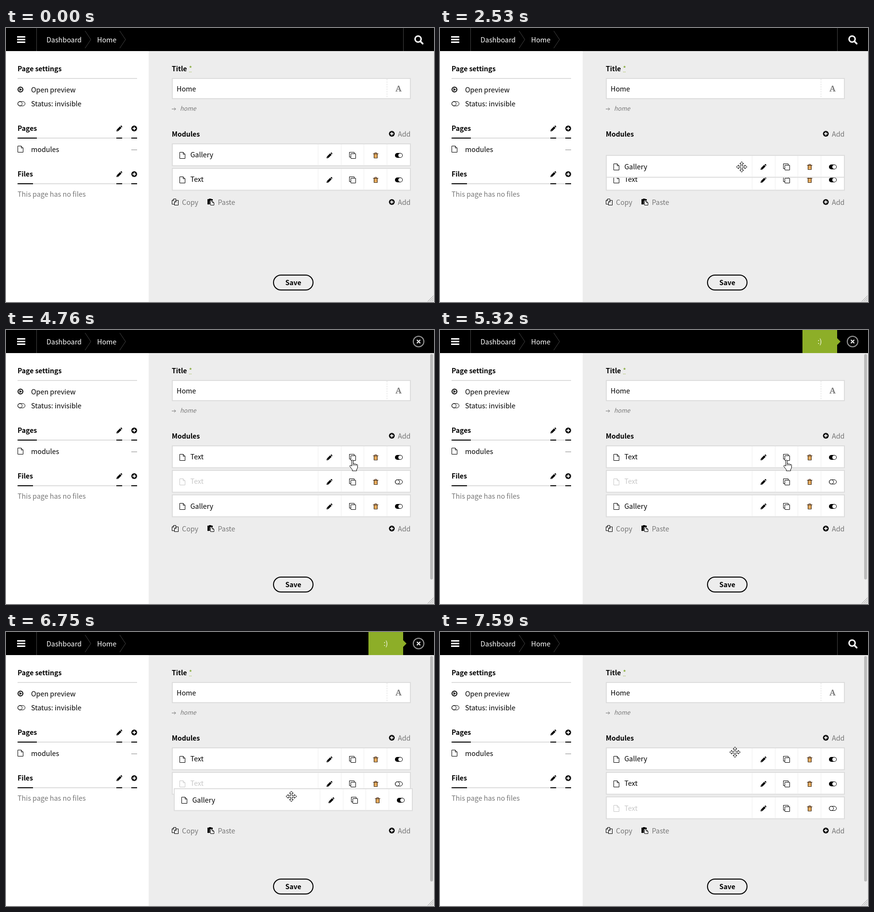
An HTML page that plays this animation: 888 px wide and 570 px high, repeating every 8000 ms.

```html
<!DOCTYPE html>
<html lang="en">
<head>
<meta charset="utf-8">
<title>Page modules</title>
<style>
html, body { margin: 0; width: 100%; height: 100%; overflow: hidden; background: #ededed; }
svg { display: block; }
text { font: 14.32px "Noto Sans CJK JP", "Noto Sans CJK SC", "Noto Sans CJK", "Noto Sans", sans-serif; white-space: pre; }
.b { font-weight: 700; font-size: 14px; }
.g { fill: #777; }
.w { fill: #fff; }
.line { fill: none; stroke: currentColor; }
.pale { color: #c8c8c8; fill: #c8c8c8; }
</style>
</head>
<body>
<svg id="stage" width="888" height="570" viewBox="0 0 888 570">
<defs>
  <g id="pencil"><path d="M-6 6L-5.2 2.4L1.5-4.3L4.6-1.2L-2.2 5.4ZM2.4-5.1L3.5-6Q4.3-6.4 5.2-5.5Q6.4-4.4 5.9-3.5L5.3-2.1Z"/><path d="M-4.6 3.2L-3 4.8" stroke="#fff" stroke-width=".8"/></g>
  <g id="plus"><circle r="6"/><path d="M-3.5 0H3.5M0-3.5V3.5" stroke="#fff" stroke-width="2"/></g>
  <path id="file" class="line" d="M-5.5-6.5H1.5L5.5-2.5V6.5H-5.5ZM1.5-6.5V-2.5H5.5"/>
  <g id="clone" class="line"><path d="M-3.5 3.5H-6.5V-6.5H3.5V-3.5"/><rect x="-3.5" y="-3.5" width="10" height="10" rx=".5"/></g>
  <g id="trash"><path d="M-3.5-3H3.5V5.5H-3.5Z" fill="#ffd08a" stroke="#2b1500"/><path d="M-1.5-1.5V4M1.5-1.5V4" stroke="#b05a00"/><path d="M-5.5-3.5H5.5M-2-4V-5.5H2V-4" fill="none" stroke="#4a2500"/></g>
  <g id="on"><rect x="-8" y="-5" width="16" height="10" rx="5"/><circle cx="3" r="4" fill="#fff"/></g>
  <g id="off" class="line"><rect x="-7.5" y="-4.5" width="15" height="9" rx="4.5"/><circle cx="-3" r="4.5"/></g>
  <g id="pages" class="line"><path d="M-2 4.5H-6.5V-3L-3-6.5H1.5V-3M-3-6.5V-3H-6.5"/><path d="M6.5-3.5V6.5H-1.5V0L2-3.5ZM2-3.5V0H-1.5"/></g>
  <g id="board"><path d="M-7-6H-4V-7H1V-6H4V-3H-1L-2-2V5H-7Z"/><path d="M-.5-1.5H3.5L6.5 1.5V6.5H-.5ZM3.5-1.5V1.5H6.5" fill="#fff" stroke="#000"/></g>
  <path id="move" d="M0-11l4 4.5h-2.5v5h5v-2.5l4.5 4-4.5 4v-2.5h-5v5h2.5l-4 4.5-4-4.5h2.5v-5h-5v2.5l-4.5-4 4.5-4v2.5h5v-5h-2.5z"/>
  <path id="hand" d="M-1.5 13V1.5Q0-.7 1.5 1.5V8.5Q3.5 6.8 4.5 9Q6.5 7.6 7.5 9.8Q10 8.6 10.5 11V15Q10.5 18 8.5 20V23H-.5V20.5L-5.5 14Q-6 11-3.5 11.5L-1.5 13ZM1.5 8.5V12M4.5 9V12M7.5 9.8V12.5"/>
  <path id="arrow" d="M.5.5V16.5L4 13.2L6.5 18.5L8.7 17.5L6.3 12.2H11.5Z"/>
</defs>

<rect width="888" height="570" fill="#ededed"/>
<rect y="48" width="296" height="522" fill="#fff"/>
<rect width="888" height="48"/>
<path d="M23 18.5H40M23 24H40M23 29.5H40" stroke="#fff" stroke-width="3"/>
<path d="M63.5 0V48" stroke="#444"/>
<path d="M164 6L176 24L164 42M236 6L248 24L236 42" fill="none" stroke="#444"/>
<text class="w" x="84" y="30">Dashboard</text>
<text class="w" x="189" y="30">Home</text>
<g id="search">
  <path d="M824.5 0V48" stroke="#444"/>
  <circle cx="855" cy="23" r="6.3" fill="none" stroke="#fff" stroke-width="3"/>
  <path d="M859.8 27.8L864.5 32.5" stroke="#fff" stroke-width="3.4" stroke-linecap="round"/>
</g>
<g id="close">
  <circle cx="856" cy="24" r="11" fill="none" stroke="#999" stroke-width="2"/>
  <path d="M852.5 20.5L859.5 27.5M859.5 20.5L852.5 27.5" stroke="#fff" stroke-width="2"/>
</g>
<g id="note">
  <path d="M752 0H824V17L831 24L824 31V48H752Z" fill="#8dae28"/>
  <text class="w" x="788" y="29" text-anchor="middle">:)</text>
</g>

<text class="b" x="24" y="90">Page settings</text>
<path d="M24 105H272M24 229H272M24 324H272" stroke="#ddd" stroke-width="2"/>
<path d="M24 229H64M229 229H241M260 229H272M24 324H56M229 324H241M260 324H272" stroke="#000" stroke-width="2"/>
<circle cx="30" cy="128" r="5" fill="none" stroke="#000" stroke-width="2"/>
<path d="M28 125L33.3 128L28 131Z"/>
<text x="52" y="134">Open preview</text>
<use href="#off" x="32" y="157.5"/>
<text x="52" y="163">Status: invisible</text>
<text class="b" x="24" y="214">Pages</text>
<use href="#pencil" x="235" y="209"/><use href="#plus" x="266" y="209"/>
<use href="#file" x="30" y="252"/>
<text x="52" y="258">modules</text>
<path d="M260 253.5H272" stroke="#888"/>
<text class="b" x="24" y="309">Files</text>
<use href="#pencil" x="235" y="304"/><use href="#plus" x="266" y="304"/>
<text class="g" x="24" y="351">This page has no files</text>

<text class="b" x="344" y="90">Title</text>
<text x="379.5" y="90" style="fill:#7ba428">*</text>
<path d="M380 91.5H386" stroke="#8dae28" stroke-dasharray="1 1"/>
<rect x="345" y="105" width="494" height="42" fill="#fff" stroke="#ddd" stroke-width="2"/>
<path d="M790.5 106V146" stroke="#ddd" stroke-dasharray="3 2"/>
<text x="354" y="132">Home</text>
<text x="814.5" y="132" text-anchor="middle" class="g" style="font:bold 17px 'Noto Serif','Liberation Serif',serif">A</text>
<path d="M344 168.5H352M349 165.5L352 168.5L349 171.5" fill="none" stroke="#777"/>
<text class="g" x="361" y="172" style="font-size:12.4px;font-style:italic">home</text>
<text class="b" x="344" y="226">Modules</text>
<use href="#plus" x="800.5" y="220"/>
<text class="g" x="813" y="226">Add</text>

<g id="foot">
  <use href="#pages" x="351" y="362"/>
  <text class="g" x="365" y="368">Copy</text>
  <use href="#board" x="425" y="362"/>
  <text class="g" x="439.5" y="368">Paste</text>
  <use href="#plus" x="800.5" y="362"/>
  <text class="g" x="813" y="368">Add</text>
</g>
<rect x="555" y="514" width="82" height="31" rx="15.5" fill="none" stroke="#000" stroke-width="2"/>
<text class="b" x="596" y="535" text-anchor="middle">Save</text>
<path d="M875 569L887 557M879 569L887 561M883 569L887 565" stroke="#999"/>
<rect id="bar" x="880" y="50" width="6" height="469" rx="3" fill="#bbb"/>
<g id="rows"></g>
<g id="cursor" fill="#fff" stroke="#000" stroke-linejoin="round"><use id="shape" href="#arrow"/></g>
</svg>
<script>
const $ = id => document.getElementById(id);
const LOOP = 8000, LEFT = 344, SLOTS = [240, 291, 342];
const SWAP = 2310, DROP = 3130, CLONE = 4760, LIFT = 6640, LAND = 7570, SAVED = 7590;

// time, x, y of the pointer's hot spot, and whether the way there is linear
const track = [
  [1190, 900, 281], [1820, 626, 265],
  [2310, 626, 265], [2830, 625, 328],
  [3500, 625, 328], [4080, 719, 270],
  [5320, 719, 270], [5960, 595, 354], [6120, 589, 361, true],
  [6145, 589, 361], [6170, 587, 365, true],
  [6630, 587, 365], [6750, 592, 342, true], [7140, 612, 250, true]
];

function pointer(t) {
  const i = track.findIndex(k => k[0] > t);
  if (i === 0) return track[0].slice(1, 3);
  if (i < 0) return track[track.length - 1].slice(1, 3);
  const a = track[i - 1], b = track[i];
  let p = (t - a[0]) / (b[0] - a[0]);
  if (!b[3]) p = (1 - Math.cos(Math.PI * p)) / 2;
  return [1, 2].map(n => Math.round(a[n] + (b[n] - a[n]) * p));
}

function makeRow(name, hidden) {
  const pale = hidden ? ' class="pale"' : '';
  const tools = ['pencil', 'clone', 'trash', hidden ? 'off' : 'on'];
  const row = document.createElementNS('http://www.w3.org/2000/svg', 'g');
  row.innerHTML =
    `<rect x="1" y="1" width="494" height="45.5" fill="#fff" stroke="#ddd" stroke-width="2"/>
    <path d="M303.5 2V45M351.5 2V45M398.5 2V45M446.5 2V45" stroke="#eee"/>
    <g${pale}><use href="#file" x="22" y="25"/><text x="38.5">${name}</text></g>` +
    tools.map((id, i) => `<use href="#${id}" x="${327 + i * 48}" y="25"/>`).join('');
  $('rows').append(row);
  return row;
}

const text = makeRow('Text'), copy = makeRow('Text', true), gallery = makeRow('Gallery');

function place(row, x, y) {
  row.setAttribute('transform', `translate(${x} ${y})`);
  row.querySelector('text').setAttribute('y', y === SLOTS[0] || y === SLOTS[1] ? 29 : 30);
}
const seat = (row, slot) => place(row, LEFT, SLOTS[slot]);
const show = (el, on) => el.setAttribute('visibility', on ? 'visible' : 'hidden');

function drawRows(t) {
  let slots;
  if (t < SWAP) slots = [1, 1, 0];
  else if (t < DROP) {
    const [x, y] = pointer(t), top = y - 25;
    slots = [top > 265 ? 0 : 1, 1];
    place(gallery, LEFT + x - 626, top);
  } else if (t < CLONE) slots = [0, 1, 1];
  else if (t < LIFT) slots = [0, 1, 2];
  else if (t < LAND) {
    const [x, y] = pointer(t - 34), top = y - 23;
    slots = [top < 266 ? 1 : 0, top < 317 ? 2 : 1];
    place(gallery, LEFT + x - 587, top);
  } else slots = [1, 2, 0];
  seat(text, slots[0]);
  seat(copy, slots[1]);
  if (slots.length > 2) seat(gallery, slots[2]);
}

function drawCursor(t) {
  const [x, y] = pointer(t);
  const dragging = t >= SWAP && t < DROP || t >= LIFT && t < LAND;
  const onRow = x < 840 && SLOTS.slice(0, t < CLONE ? 2 : 3).some(s => y >= s && y < s + 47);
  const shape = dragging || onRow && x < 647 ? 'move' : onRow ? 'hand' : 'arrow';
  $('shape').setAttribute('href', '#' + shape);
  $('cursor').setAttribute('transform', `translate(${x} ${y})`);
}

function draw(t) {
  const saving = t >= CLONE && t < SAVED, cloned = t >= CLONE;
  show($('search'), !saving);
  show($('close'), saving);
  show($('note'), saving);
  $('note').setAttribute('opacity', Math.min(1, Math.max(0, (t - CLONE - 30) / 250)));
  show($('bar'), cloned);
  show(copy, cloned);
  $('foot').setAttribute('transform', `translate(0 ${cloned ? 51 : 0})`);
  drawRows(t);
  drawCursor(t);
}

const start = performance.now();
function tick() {
  draw((performance.now() - start) % LOOP);
  requestAnimationFrame(tick);
}
tick();
</script>
</body>
</html>
```
